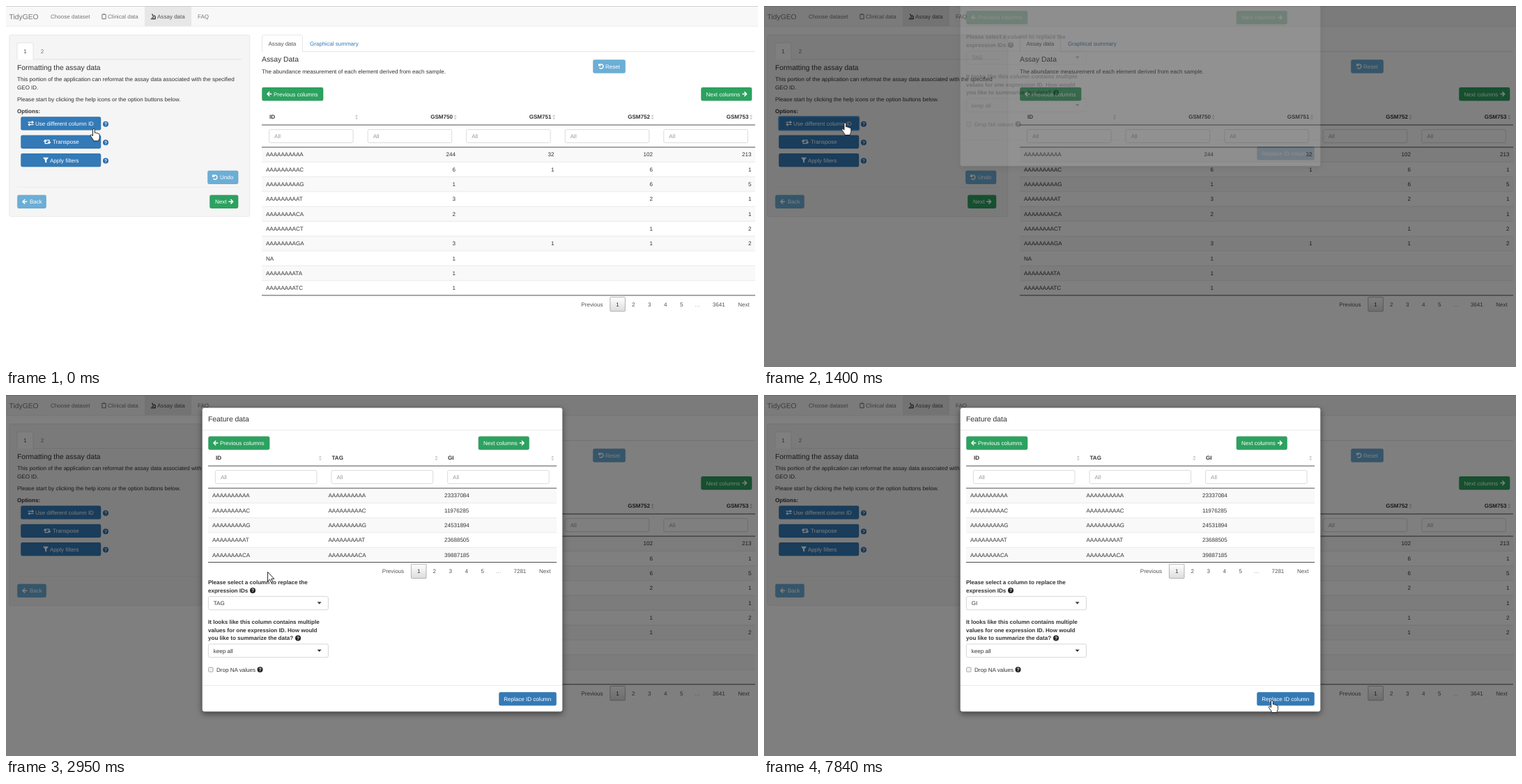
Write an HTML page that moves like this. It is 1079 by 519 pixels and loops after 8 s.

```html
<!DOCTYPE html>
<html lang="en">
<head>
<meta charset="utf-8">
<title>TidyGEO</title>
<style>
html, body { margin: 0; width: 100%; height: 100%; overflow: hidden; background: #fff; }
svg { display: block; width: 100%; height: 100%; }
text { font: 8.05px "Liberation Sans", Arial, sans-serif; fill: #333; text-rendering: geometricPrecision; white-space: pre; }
.big { font-size: 10.35px; }
.bold { font-weight: bold; }
.mid { text-anchor: middle; }
.end { text-anchor: end; }
.white { fill: #fff; }
.gray { fill: #777; }
.dim { fill: #999; }
.tab { fill: #555; }
.link { fill: #337ab7; }
.page { fill: #555; }
.icon { fill: none; stroke: #fff; stroke-width: 1.5; }
.shadow { filter: drop-shadow(0 3px 4.5px rgba(0,0,0,.5)); }
.drop { filter: drop-shadow(0 2px 2px rgba(0,0,0,.14)); }
.glow { filter: drop-shadow(0 0 2px rgba(102,175,233,.7)); }
</style>
</head>
<body>
<svg id="stage" viewBox="0 0 1079 519" preserveAspectRatio="none"></svg>
<script>
const BLUE = '#337ab7', SKY = '#6baed6', GREEN = '#2ca25f';

const text = (x, y, s, cls = '') =>
  `<text x="${x}" y="${y + (cls.includes('big') ? 3.7 : 2.9)}" class="${cls}">${s}</text>`;
const rect = (x, y, w, h, fill, extra = '') =>
  `<rect x="${x}" y="${y}" width="${w}" height="${h}" fill="${fill}" ${extra}/>`;
const line = (x1, x2, y, color, width = 0.8) =>
  `<path d="M${x1} ${y}H${x2}" stroke="${color}" stroke-width="${width}"/>`;
const group = (id, body, extra = '') => `<g id="${id}" ${extra}>${body}</g>`;

const ICONS = {
  left: 'M7.3 0H1M4.2-3.2L1 0 4.2 3.2',
  right: 'M0 0H6.3M3.1-3.2L6.3 0 3.1 3.2',
  undo: 'M1.2-1.6A3.1 3.1 0 1 1 1.4 2M.7-3.8V-1H3.5',
  swap: 'M0-1.6H7.5M5.6-3.4L7.7-1.6 5.6.2M8.4 1.7H.9M2.8-.1L.7 1.7 2.8 3.5',
  retweet: 'M6.6 2.4H2.2V-2M.3-.3L2.2-2.4 4.1-.3M3.6-2.4H8V2M6.1.3L8 2.4 9.9.3',
  clipboard: 'M.6-2.9H5.9V3.5H.6ZM2-3.4H4.5',
  microscope: 'M2.2-3.6L4.4.8M.3 3.6H7.4M1.5 1.9H4.7M4.8-1.4C7.8-.6 7.3 2.4 5.8 3.4'
};
const icon = (name, x, y, extra = '') =>
  `<path class="icon" transform="translate(${x} ${y})" d="${ICONS[name]}" ${extra}/>`;
const funnel = (x, y) =>
  `<path fill="#fff" d="M${x} ${y - 3.8}h8.2l-3 3.6v4.4l-2.2-1.6v-2.8z"/>`;
const help = (x, y, color) =>
  `<circle cx="${x}" cy="${y}" r="4" fill="${color}"/>` +
  `<text x="${x}" y="${y + 2.4}" class="bold mid white" style="font-size:6.8px">?</text>`;
const button = (x, y, w, fill, label, tx) =>
  rect(x + .3, y + .3, w - .6, 19.2, fill, 'rx="2.3" stroke="#000" stroke-opacity=".12" stroke-width=".6"') +
  text(tx, y + 9.8, label, 'white');
const sorter = (x, y) =>
  `<path fill="#ccc" d="M${x - 2} ${y - .8}h4l-2-3zM${x - 2} ${y + .8}h4l-2 3z"/>`;
const field = (x, y, w, label, cls) =>
  rect(x, y, w, 19, '#fff', 'rx="2" stroke="#ccc" stroke-width=".7"') + text(x + 7.5, y + 9.6, label, cls);
const tab = (x, y, w) =>
  `<path d="M${x} ${y + 24}V${y + 2}q0-2 2-2h${w - 4}q2 0 2 2v22" fill="#fff" stroke="#ddd" stroke-width=".7"/>` +
  rect(x + .4, y + 23, w - .8, 1.6, '#fff');

function tableBody(x, w, top, rows, columns) {
  return rows.map((row, i) => {
    const y = top + i * 21.3;
    return (i % 2 ? '' : rect(x, y, w, 21.3, '#f9f9f9')) + (i ? line(x, x + w, y, '#ddd', .6) : '') +
      row.map((s, c) => text(columns[c][0], y + 10.5, s, columns[c][1])).join('');
  }).join('') + line(x, x + w, top, '#222') + line(x, x + w, top + rows.length * 21.3, '#222');
}

function pager(x, y, last) {
  const at = (dx, s, cls = 'mid page') => text(x + dx, y, s, cls);
  return at(0, 'Previous', 'page') +
    rect(x + 41.6, y - 10, 21.6, 20.4, 'url(#pageFill)', 'rx="1" stroke="#979797" stroke-width=".7"') +
    at(52.4, 1, 'mid') + [2, 3, 4, 5].map((n, i) => at(75 + i * 23, n)).join('') +
    at(167, '…', 'mid dim') + at(197.6, last) + at(233.4, 'Next');
}

const A = n => 'A'.repeat(n);
const ids = [A(10), A(9) + 'C', A(9) + 'G', A(9) + 'T', A(8) + 'CA', A(8) + 'CT', A(8) + 'GA', 'NA', A(8) + 'TA', A(8) + 'TC'];
const counts = ['244 32 102 213', '6 1 6 1', '1 - 6 5', '3 - 2 1', '2 - - 1', '- - 1 2', '3 1 1 2', '1', '1', '1'];
const assayRows = ids.map((id, i) => [id, ...counts[i].split(' ').map(s => s === '-' ? '' : s)]);
const tagRows = [23337084, 11976285, 24531894, 23688505, 39887185].map((gi, i) => [ids[i], ids[i], gi]);

const navbar =
  rect(0, 0, 1079, 29, '#f8f8f8') + rect(199, 0, 67, 29, '#e7e7e7') +
  line(0, 1079, 29.2, '#e7e7e7') + line(0, 1079, .3, '#bbb') +
  text(4.5, 15, 'TidyGEO', 'big gray') + text(64, 15, 'Choose dataset', 'gray') +
  icon('clipboard', 137.3, 15, 'style="stroke:#777;stroke-width:1"') + text(146, 15, 'Clinical data', 'gray') +
  icon('microscope', 207.4, 15, 'style="stroke:#444;stroke-width:1.4"') + text(217, 15, 'Assay data', 'tab') +
  text(275, 15, 'FAQ', 'gray');

const sidebar =
  rect(4.8, 41.6, 345, 261, '#f5f5f5', 'rx="2.3" stroke="#e3e3e3" stroke-width=".7"') +
  line(16, 338, 76.8, '#ddd') + tab(16, 53, 23) +
  text(27.5, 65, 1, 'mid tab') + text(52, 65, 2, 'mid gray') +
  text(16, 88, 'Formatting the assay data', 'big') +
  text(16, 105.4, 'This portion of the application can reformat the assay data associated with the specified') +
  text(16, 117, 'GEO ID.') +
  text(16, 134, 'Please start by clicking the help icons or the option buttons below.') +
  text(16, 151.5, 'Options:', 'bold') +
  button(21, 159, 115.5, BLUE, 'Use different column ID', 42) + icon('swap', 31.5, 168.8, 'style="stroke-width:1.2"') +
  button(21, 185.4, 115.5, BLUE, 'Transpose', 67) + icon('retweet', 54, 195.2, 'style="stroke-width:1.3"') +
  button(21, 211.8, 115.5, BLUE, 'Apply filters', 63) + funnel(53, 221.6) +
  [169.8, 196.2, 222.6].map(y => help(143, y, '#2b6cab')).join('') +
  button(289, 236.4, 44.5, SKY, 'Undo', 307) + icon('undo', 296, 246.2) +
  line(16, 338, 260.5, '#eaeaea') +
  button(16, 271.4, 42, SKY, 'Back', 34) + icon('left', 23, 281.2) +
  button(292, 271.4, 41.5, GREEN, 'Next', 300) + icon('right', 319.3, 281.2);

const main =
  line(367, 1075, 65.6, '#ddd') + tab(367.4, 41.8, 58) +
  text(376.5, 53.7, 'Assay data', 'tab') + text(436, 53.7, 'Graphical summary', 'link') +
  text(367, 76.5, 'Assay Data', 'big') +
  text(367, 94, 'The abundance measurement of each element derived from each sample.') +
  button(842, 77, 47, SKY, 'Reset', 860) + icon('undo', 850, 86.8) +
  button(367, 116.8, 88.5, GREEN, 'Previous columns', 384) + icon('left', 374, 126.6) +
  button(997, 116.8, 73.5, GREEN, 'Next columns', 1004.5) + icon('right', 1056.3, 126.6) +
  text(378, 159.5, 'ID', 'bold') + sorter(503, 159.8) +
  [0, 1, 2, 3].map(i => text(641 + i * 141.5, 159.5, 'GSM75' + i, 'bold end') + sorter(644.6 + i * 141.5, 159.8)).join('') +
  line(367, 1075, 171, '#222') +
  [0, 1, 2, 3, 4].map(i => field(377.6 + i * 141.55, 177.6, 120.5, 'All', 'dim')).join('') +
  tableBody(367, 708, 203, assayRows, [[373, ''], [645, 'end'], [786.5, 'end'], [928, 'end'], [1069.5, 'end']]) +
  pager(825.2, 428.6, 3641);

const modalTable =
  [['ID', 450.8], ['TAG', 617.4], ['GI', 784.2]].map(([name, sx], i) =>
    text(301 + i * 166.5, 90.5, name, 'bold') + sorter(sx, 90.8) +
    field(300.4 + i * 166.6, 108.4, 145.6, 'All', 'dim')).join('') +
  line(290, 790, 102, '#222') +
  tableBody(290, 500, 134, tagRows, [[296, ''], [462.5, ''], [629, '']]) +
  pager(539.8, 253.2, 7281);

function select(id, y, value, items) {
  const h = items.length * 15 + 8;
  const row = i => rect(291, y + 24 + i * 15, 171.5, 15, '#f5f5f5', `id="${id}Row${i}"`);
  return rect(290.4, y, 172, 19.2, '#fff', 'rx="2.3" stroke="#ccc" stroke-width=".8"') +
    `<path id="${id}Down" fill="#333" d="M446.6 ${y + 8}h6l-3 3.2z"/>` +
    group(id + 'Open',
      rect(290.4, y, 172, 19.2, '#fff', 'class="glow" rx="2.3" stroke="#66afe9" stroke-width=".9"') +
      `<path fill="#333" d="M446.6 ${y + 11}h6l-3-3.2z"/>` +
      rect(290.4, y + 19.6, 172, h + 10 - (items.length > 1 ? 0 : 1), '#fff', 'class="drop" stroke="#d0d0d0" stroke-width=".6"') +
      items.map((s, i) => row(i) + text(297.8, y + 31.5 + i * 15, s)).join('')) +
    text(297.8, y + 9.7, value, id + 'Value');
}
const caret = (id, x, y) => rect(x, y, .8, 9, '#222', `id="${id}"`);

const modalLower =
  text(290, 269.5, 'Please select a column to replace the', 'bold') +
  text(290, 281, 'expression IDs', 'bold') + help(354, 281, '#222') +
  text(290, 326.5, 'It looks like this column contains multiple', 'bold') +
  text(290, 338, 'values for one expression ID. How would', 'bold') +
  text(290, 349.5, 'you like to summarize the data?', 'bold') + help(419, 349.5, '#222') +
  rect(290.6, 391.6, 6.4, 6.4, '#f2f2f2', 'rx="1" stroke="#999" stroke-width=".8"') +
  text(302, 394.8, 'Drop NA values') + help(364.5, 394.8, '#222') +
  line(282, 798, 417.6, '#e5e5e5') +
  button(707, 427, 83, BLUE, 'Replace ID column', 714.3) +
  select('how', 358, 'keep all', ['keep all']) + caret('howCaret', 325.3, 363) +
  select('col', 289.6, 'TAG', ['TAG', 'GI']) + caret('colCaret', 314.2, 294.6);

const modal =
  rect(281.5, 18.2, 517, 437, '#fff', 'id="sheet" class="shadow" rx="3.4" stroke="#000" stroke-opacity=".3" stroke-width=".6"') +
  text(290, 34, 'Feature data', 'big') + line(282, 798, 50.6, '#e5e5e5') +
  button(290, 59.2, 88.5, GREEN, 'Previous columns', 307) + icon('left', 297, 69) +
  button(677.5, 59.2, 73.5, GREEN, 'Next columns', 685) + icon('right', 736.8, 69) +
  group('table', modalTable) + group('lower', modalLower);

const pointer = 'fill="#fff" stroke="#111" stroke-width=".9" stroke-linejoin="round"';
const cursors =
  `<path id="arrow" ${pointer} d="M0 0V13.5L3 10.6 5 15.2 7.2 14.2 5.2 9.8H9.3Z"/>` +
  `<path id="hand" ${pointer} d="M-1.5 1.2C-1.5-.4 1.3-.4 1.3 1.2V6C1.8 5.3 3.6 5.4 3.9 6.6 4.6 5.8 6.2 6.2 6.4 7.4 7.2 6.9 8.4 7.4 8.4 8.6V12.5C8.4 14.5 7 15 7 17.5H-.3C-.5 15.5-3.5 12.5-4.6 10.2-5.2 8.6-3.4 8-2.4 9.2L-1.5 10.3Z"/>` +
  `<path id="ibeam" fill="none" stroke="#111" stroke-width="1.3" d="M-3.4-6.6H-1L0-6 1-6.6H3.4M0-6V6M-3.4 6.6H-1L0 6 1 6.6H3.4"/>`;

document.getElementById('stage').innerHTML =
  '<defs><linearGradient id="pageFill" x2="0" y2="1"><stop stop-color="#fff"/><stop offset="1" stop-color="#dcdcdc"/></linearGradient></defs>' +
  navbar + sidebar + main +
  rect(20.9, 158.6, 115.7, 20.2, 'none', 'id="ring" rx="2" stroke="#5c9fdb" stroke-width="1.3"') +
  rect(0, 0, 1079, 519, '#000', 'id="shade"') +
  group('modal', modal) + group('cursor', cursors);

const el = {};
document.querySelectorAll('[id]').forEach(node => el[node.id] = node);
const colValue = document.querySelector('.colValue');
const show = (node, on) => node.style.display = on ? '' : 'none';

// start, backdrop opacity, modal opacity, modal offset, table loaded
const opening = [
  [0, 0, 0, 0, 0], [1160, .1, 0, 0, 0], [1240, .23, 0, 0, 0], [1310, .35, 0, 0, 0],
  [1400, .5, .14, -52.5, 0], [1490, .5, .75, -22, 0], [1550, .5, 1, -9, 0],
  [1630, .5, 1, -2, 1], [1710, .5, 1, 0, 1]
];

// start, end, number of steps, points passed, cursor shape
const moves = [
  [0, 0, 1, [[126, 176.5]], () => 'hand'],
  [70, 480, 6, [[125, 175.6], [116.5, 168]], () => 'hand'],
  [1940, 2720, 11, [[150, 172], [300, 190], [520, 212], [648, 228], [560, 238], [376, 243]], () => 'arrow'],
  [2800, 3420, 9, [[376, 246], [374, 280], [371.5, 299]], (x, y) => y > 289 ? 'hand' : 'arrow'],
  [3650, 3650, 1, [[371.5, 299]], () => 'ibeam'],
  [3800, 3800, 1, [[371.5, 298]], () => 'ibeam'],
  [4130, 4810, 10, [[373, 303], [372, 314], [362, 336]], (x, y) => y < 309 ? 'ibeam' : y < 313 ? 'arrow' : 'hand'],
  [5210, 5210, 1, [[362, 336]], () => 'arrow'],
  [5670, 6130, 7, [[366, 342], [367, 352], [365, 365]], (x, y) => y > 358 ? 'hand' : 'arrow'],
  [6300, 6300, 1, [[366, 367]], () => 'ibeam'],
  [7060, 7840, 11, [[380, 372], [520, 405], [690, 436], [729, 439]], (x, y) => x > 707 && y > 427 ? 'hand' : 'arrow']
];

const latest = (table, t) => table.filter(row => row[0] <= t).pop();

function cursorAt(t) {
  const [start, end, steps, points, shape] = latest(moves, t);
  const k = steps > 1 ? Math.min(1, Math.floor((t - start) / (end - start) * (steps - 1) + 1e-6) / (steps - 1)) : 0;
  const along = k * (points.length - 1);
  const i = Math.min(Math.floor(along), Math.max(0, points.length - 2));
  const a = points[i], b = points[i + 1] || a;
  const x = a[0] + (b[0] - a[0]) * (along - i), y = a[1] + (b[1] - a[1]) * (along - i);
  return { x, y, shape: shape(x, y) };
}

function draw(t) {
  const [, shade, opacity, offset, loaded] = latest(opening, t);
  el.shade.setAttribute('opacity', shade);
  el.modal.setAttribute('opacity', opacity);
  el.modal.setAttribute('transform', `translate(0 ${offset})`);
  el.sheet.setAttribute('height', loaded ? 437 : 264.5);
  el.lower.setAttribute('transform', `translate(0 ${loaded ? 0 : -172.5})`);
  show(el.table, loaded);
  show(el.ring, t >= 940 && t < 1600);

  const { x, y, shape } = cursorAt(t);
  el.cursor.setAttribute('transform', `translate(${x} ${y})`);
  for (const name of ['arrow', 'hand', 'ibeam']) show(el[name], name === shape);

  for (const [id, from, to] of [['col', 3650, 5040], ['how', 6300, 7060]]) {
    const open = t >= from && t < to;
    show(el[id + 'Open'], open);
    show(el[id + 'Down'], !open);
    show(el[id + 'Caret'], open && (t - from) % 1060 < 530);
  }
  const second = t > 4130 && y > 328;
  show(el.colRow0, !second);
  show(el.colRow1, second);
  colValue.textContent = t < 5040 ? 'TAG' : 'GI';
}

const began = performance.now();
function tick() {
  draw((performance.now() - began) % 8000);
  requestAnimationFrame(tick);
}
tick();
</script>
</body>
</html>
```
